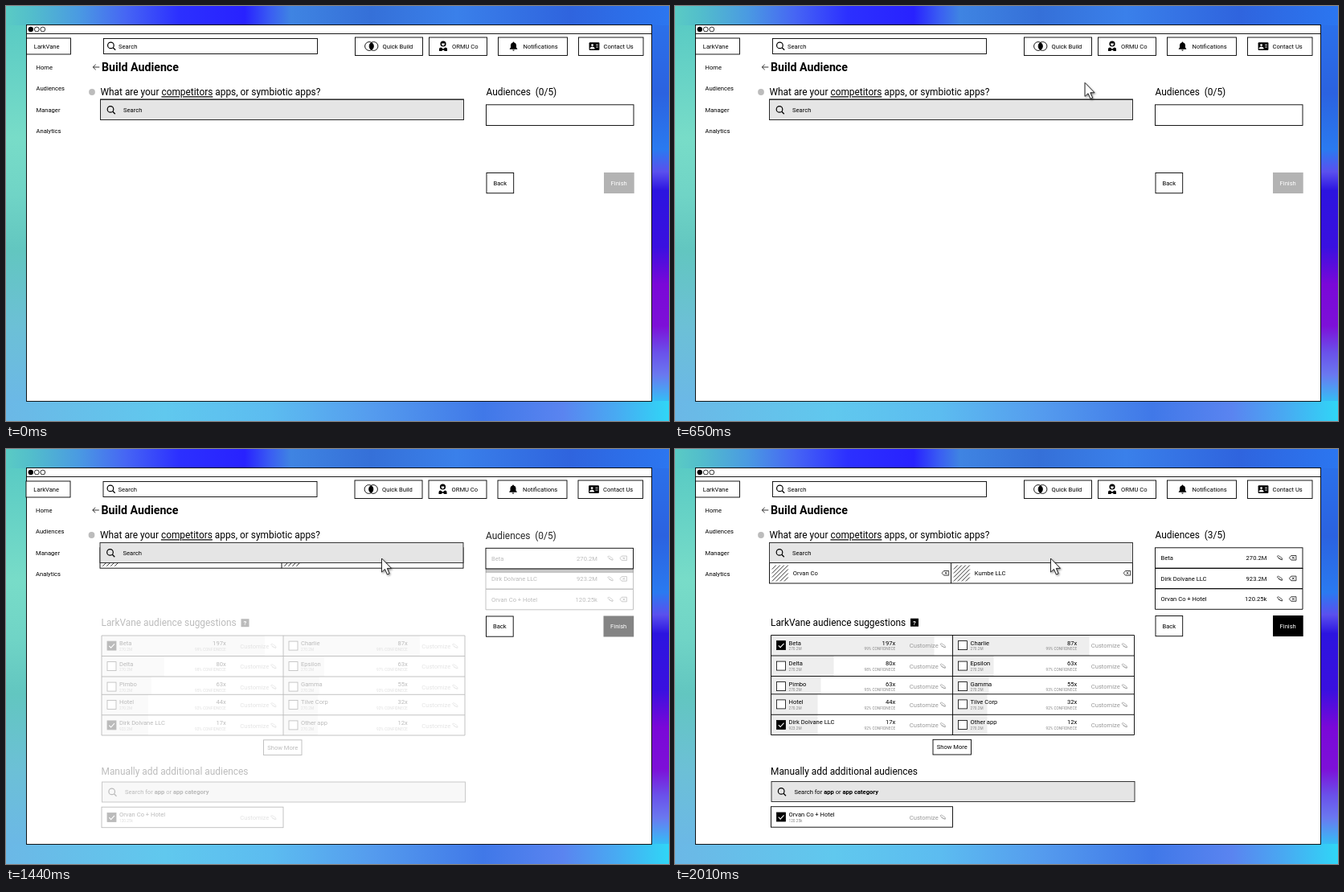
Recreate the animation shown at these times as an HTML page. Size 825 px wide and 516 px high, loop 4.87 s.

```html
<!DOCTYPE html>
<html lang="en">
<head>
<meta charset="utf-8">
<title>Build Audience</title>
<style>
  html, body { margin: 0; width: 100%; height: 100%; overflow: hidden; }
  svg { display: block; width: 825px; height: 516px; }
  text { font: 7.6px Roboto, sans-serif; white-space: pre; }
  .title { font-size: 11.9px; }
  .heading { font-size: 14.2px; font-weight: 700; }
  .tiny { font-size: 4.75px; fill: #888; }
  .end { text-anchor: end; }
  .mid { text-anchor: middle; }
  .muted { fill: #999; }
  .box { fill: #fff; stroke: #000; stroke-width: .9; }
  .field { fill: #e5e5e5; stroke: #222; stroke-width: .9; }
  .line { fill: none; stroke: #000; stroke-width: .9; }
</style>
</head>
<body>
<svg id="stage" viewBox="0 0 825 516"></svg>
<script>
const SIZES = { title: 11.9, heading: 14.2, tiny: 4.75 };

// Text is placed by the middle of its capitals.
function text(x, y, content, cls = '', extra = '') {
  const size = SIZES[cls.split(' ')[0]] || 7.6;
  return `<text x="${x}" y="${y + size * .36}" class="${cls}" ${extra}>${content}</text>`;
}
const rect = (x, y, w, h, cls = 'box', extra = '') =>
  `<rect x="${x}" y="${y}" width="${w}" height="${h}" class="${cls}" ${extra}/>`;
const line = (d, extra = '') => `<path class="line" d="${d}" ${extra}/>`;
const group = (id, content, extra = '') => `<g id="${id}" ${extra}>${content}</g>`;
const fill = (id, vertical, stops) =>
  `<linearGradient id="${id}" ${vertical ? 'x2="0" y2="1"' : ''}>` +
  stops.map(([at, color]) => `<stop offset="${at}%" stop-color="${color}"/>`).join('') +
  '</linearGradient>';

const magnifier = (x, y) =>
  `<circle class="line" cx="${x - .6}" cy="${y - .6}" r="3.8" style="stroke-width:1.2"/>` +
  line(`M${x + 2.2} ${y + 2.2}l3 3`, 'style="stroke-width:1.3"');
const pencil = (x, y, color) =>
  `<path d="M${x - 3.4} ${y - 1.8}l1.6 -1 4.4 2.8 .8 2 -2.4 -.2zm1.4 2.2l5 2.2" fill="none" stroke="${color}" stroke-width=".7"/>`;
const backspace = (x, y) =>
  line(`M${x - 4.3} ${y}l2.3 -2.8h6.2v5.6h-6.2zM${x - .8} ${y - 1.4}l2.8 2.8m0 -2.8l-2.8 2.8`, 'style="stroke-width:.75"');
const checkbox = (x, y, on) =>
  rect(x, y - 5.5, 11, 11, 'box', `style="stroke-width:.8;fill:${on ? '#000' : '#fff'}"`) +
  (on ? `<path d="M${x + 2.3} ${y + .2}l2.3 2.4 4.4 -4.8" fill="none" stroke="#fff" stroke-width="1.1"/>` : '');
const customize = (x, y) => text(x, y, 'Customize', 'muted') + pencil(x + 41.5, y, '#999');

function backdrop() {
  return '<defs>' +
    fill('top', false, [[0, '#5acbc4'], [4, '#52bdcc'], [11, '#4a9ae2'], [18, '#4666f4'], [26, '#2c30ff'],
      [36, '#2822ff'], [40, '#3a5ff2'], [43, '#3f84e2'], [55, '#3570d8'], [68, '#3a80ea'], [85, '#2f64de'], [100, '#2b76f0']]) +
    fill('bottom', false, [[0, '#6bb8e6'], [24, '#60c8ee'], [40, '#5cbcf0'], [55, '#559cee'], [72, '#4078e8'],
      [84, '#5a84f0'], [92, '#48aaf2'], [100, '#30d6f6']]) +
    fill('left', true, [[0, '#5acbc4'], [30, '#78dcc8'], [45, '#70d4c6'], [60, '#62c6c0'], [80, '#6cc0d6'], [100, '#6bb8e6']]) +
    fill('right', true, [[0, '#2b70ea'], [18, '#2b62e0'], [33, '#2a7af0'], [39, '#5a50ee'], [44, '#2c14e0'], [59, '#3a10e0'],
      [69, '#7a08d8'], [80, '#7d10d8'], [87, '#6a50ea'], [93, '#6a78f0'], [100, '#35bdf5']]) +
    '<filter id="shadow" x="-50%" y="-50%" width="200%" height="200%"><feDropShadow dx="1.2" dy="1.4" stdDeviation=".9" flood-opacity=".45"/></filter></defs>' +
    rect(0, 0, 825, 24, '', 'fill="url(#top)"') + rect(0, 491, 825, 25, '', 'fill="url(#bottom)"') +
    rect(0, 24, 26, 467, '', 'fill="url(#left)"') + rect(803, 24, 22, 467, '', 'fill="url(#right)"') +
    rect(25.5, 23.5, 778, 468) + line('M25.5 34.5h778') +
    [30.8, 38.3, 45.8].map((x, i) =>
      `<circle class="box" cx="${x}" cy="29" r="2.9" style="stroke-width:.8;${i ? '' : 'fill:#000'}"/>`).join('');
}

function header() {
  const buttons = [[434.5, 84, 468.5, 'Quick Build'], [526.5, 72, 555, 'ORMU Co'],
    [612.5, 86, 643.5, 'Notifications'], [712.5, 80.5, 743.5, 'Contact Us']];
  return rect(25.5, 40, 55, 20) + text(50.7, 50.2, 'LarkVane', 'mid') +
    rect(121.5, 40.5, 266, 19) + magnifier(131, 49.5) + text(140, 50.2, 'Search') +
    buttons.map(([x, w, tx, label]) => rect(x, 39, w, 22.5) + text(tx, 50.2, label)).join('') +
    // overlapping circles
    '<circle class="line" cx="452" cy="50" r="5.4"/><circle class="line" cx="457.5" cy="50" r="5.4"/>' +
    '<path d="M454.75 45.4a5.4 5.4 0 0 1 0 9.2a5.4 5.4 0 0 1 0 -9.2z"/>' +
    // person
    '<circle cx="544" cy="47" r="3.6"/><path d="M542.2 46.6h3.6v1a1.8 1.8 0 0 1 -3.6 0z" fill="#fff"/>' +
    '<path d="M539 56v-2.6q0 -2 2.4 -2l2.6 2 2.6 -2q2.4 0 2.4 2v2.6h-3l-2 -1.6 -2 1.6z"/>' +
    // bell
    '<path d="M626.8 53.8v-.8l1.2 -1.2v-3.2q.2 -2.6 2.6 -3.2a.9 .9 0 0 1 1.8 0q2.4 .6 2.6 3.2v3.2l1.2 1.2v.8zM630.3 54.5h2.4a1.2 1.2 0 0 1 -2.4 0z"/>' +
    // contact card
    '<rect x="725.6" y="45.2" width="12.8" height="9.8" rx="1"/><circle cx="729.6" cy="48.6" r="1.4" fill="#fff"/>' +
    '<path d="M726.9 53q.4 -2 2.7 -2t2.7 2zM734 48.4h3m-3 2.6h3" fill="#fff" stroke="#fff" stroke-width=".9"/>';
}

function navigation() {
  return ['Home', 'Audiences', 'Manager', 'Analytics'].map((label, i) => text(37.5, 76.2 + 26.5 * i, label)).join('') +
    line('M116.3 76h-8m3.4 -3.3l-3.4 3.3 3.4 3.3', 'style="stroke-width:.8"') +
    text(119, 76, 'Build Audience', 'heading') +
    '<circle cx="107" cy="107" r="3.9" fill="#bcbcbc"/>' +
    text(117.5, 107, 'What are your <tspan text-decoration="underline">competitors</tspan> apps, or symbiotic apps?', 'title');
}

function chips() {
  return rect(117.5, 141.5, 452, 25.5) + line('M343.5 141.5v25.5') +
    [[117.5, 'Orvan Co'], [343.5, 'Kumbe LLC']].map(([x, name]) => {
      let hatch = '';
      for (let d = 5; d < 40; d += 5) {
        const a = Math.min(d, 20), b = d - a;
        hatch += `M${x + 3.3 + b} ${144.5 + a}L${x + 3.3 + a} ${144.5 + b}`;
      }
      return line(hatch, 'style="stroke-width:.8"') + text(x + 29.3, 154.7, name) + backspace(x + 219, 154.3);
    }).join('');
}

function suggestions() {
  const tops = [231.5, 257, 282.5, 304.8, 330.3];
  // name, multiple, confidence, bar width
  const columns = [
    [119.5, [['Beta', 197, 99, 203], ['Delta', 80, 98, 78], ['Pimbo', 63, 95, 62], ['Hotel', 44, 92, 58], ['Dirk Dolvane LLC', 17, 92, 58]]],
    [345.5, [['Charlie', 87, 99, 170], ['Epsilon', 63, 97, 51], ['Gamma', 55, 93, 45], ['Tilve Corp', 32, 92, 43], ['Other app', 12, 92, 43]]]
  ];
  let out = text(119, 215.3, 'LarkVane audience suggestions', 'title') +
    rect(293, 210.7, 10, 10, '') + text(298, 215.9, '?', 'mid', 'fill="#fff" font-weight="700" style="font-weight:700"');
  for (const [x, rows] of columns) {
    rows.forEach(([name, multiple, confidence, bar], i) => {
      const y = tops[i], checked = x < 300 && (i === 0 || i === 4);
      out += rect(x, y, bar, (tops[i + 1] || 355.5) - y, '', 'fill="#eee"') +
        checkbox(x + 7, y + 12.6, checked) + text(x + 22, y + 9.3, name) +
        text(x + 22, y + 17.1, i === 4 && checked ? '923.2M' : '270.2M', 'tiny') +
        text(x + 154.7, y + 9.3, multiple + 'x', 'end') +
        text(x + 154.7, y + 17.1, confidence + '% CONFIDNECE', 'tiny end') + customize(x + 172.3, y + 13);
    });
  }
  return out + line('M119.5 231.5h452v124h-452zM345.5 231.5v124' + tops.slice(1).map(y => `M119.5 ${y}h452`).join('')) +
    rect(321, 361.3, 47.5, 18.7) + text(344.8, 370.6, 'Show More', 'mid') +
    text(119, 400.4, 'Manually add additional audiences', 'title') +
    rect(120, 413.5, 452, 25, 'field') + magnifier(132.8, 426) +
    text(148.5, 426.2, 'Search for <tspan font-weight="700">app</tspan> or <tspan font-weight="700">app category</tspan>') +
    rect(119.5, 444.7, 226, 25.5) + checkbox(126.5, 457.5, true) +
    text(141.5, 454, 'Orvan Co + Hotel') + text(141.5, 461.8, '120.25k', 'tiny') + customize(291.8, 457.8);
}

function sidePanel() {
  const rows = [['Beta', '270.2M'], ['Dirk Dolvane LLC', '923.2M'], ['Orvan Co + Hotel', '120.25k']];
  return text(597.5, 107, 'Audiences  (0/5)', 'title', 'id="before"') +
    text(597.5, 107, 'Audiences  (3/5)', 'title', 'id="after"') +
    rect(597.5, 148.5, 183.5, 0, '', 'id="sheet"') + rect(597.5, 122.8, 183.5, 25.7) +
    group('rows', rows.map(([name, size], i) => {
      const y = 135.3 + 25.6 * i;
      return (i ? line(`M597.5 ${y - 12.8}v25.6h183.5v-25.6z`) : '') + text(604.5, y, name) +
        text(736.3, y, size, 'end') + pencil(752.5, y, '#222') + backspace(768.7, y);
    }).join('')) +
    rect(598, 207.5, 33.7, 25.2) + text(614.8, 220, 'Back', 'mid') +
    rect(744, 207, 37.7, 26, '', 'id="finish"') + text(762.7, 220, 'Finish', 'mid', 'style="fill:#fff"');
}

const stage = document.getElementById('stage');
stage.innerHTML = backdrop() +
  group('content', header() + navigation() +
    group('chips', chips()) +
    rect(117.5, 116.5, 452, 25, 'field') + magnifier(130.6, 129) + text(146, 129.2, 'Search') +
    group('lower', suggestions()) + group('side', sidePanel())) +
  group('cursor', '<path d="M0 0V17L4 13.4 6.9 20 9.6 18.8 6.8 12.4H12z" fill="#fff" stroke="#111" stroke-width=".9" filter="url(#shadow)"/>');

// Smooth monotone curve through [time, value] points.
function curve(points, t) {
  const last = points.length - 1;
  if (t <= points[0][0]) return points[0][1];
  if (t >= points[last][0]) return points[last][1];
  const slope = i => (points[i + 1][1] - points[i][1]) / (points[i + 1][0] - points[i][0]);
  const tangent = i => {
    if (i === 0) return slope(0);
    if (i === last) return slope(last - 1);
    const a = slope(i - 1), b = slope(i);
    return a * b > 0 ? 2 * a * b / (a + b) : 0;
  };
  const i = points.findIndex(p => p[0] > t) - 1;
  const [t0, v0] = points[i], [t1, v1] = points[i + 1], span = t1 - t0, k = (t - t0) / span;
  return v0 + (v1 - v0) * k * k * (3 - 2 * k) +
    span * k * (1 - k) * (tangent(i) * (1 - k) - tangent(i + 1) * k);
}

const LOOP = 4870;
const cursorX = [[210, 608], [440, 575.5], [730, 499], [780, 499], [860, 488.5], [1130, 467.5]];
const cursorY = [[210, -24], [440, 22.5], [730, 107], [780, 107], [860, 117.5], [1130, 136]];
const reveal = [[1310, 0], [1440, .26], [1660, .6], [1870, .93], [2010, 1]];
const sheetHeight = [[1310, 0], [1440, 5], [1660, 25.5]];
const sheetShade = [[1310, .26], [1440, .22], [1660, .11], [1870, .02], [2010, 0]];
const part = id => document.getElementById(id);
const set = (id, name, value) => part(id).setAttribute(name, value);

function draw(t) {
  const p = curve(reveal, t), moving = t >= 1330 && t < 2010;
  set('cursor', 'transform', `translate(${curve(cursorX, t)} ${curve(cursorY, t)})`);
  set('content', 'transform', `translate(${moving ? -.5 : 0} 0)`);
  for (const id of ['lower', 'side']) set(id, 'transform', `translate(0 ${moving ? .5 : 0})`);
  set('chips', 'transform', `translate(0 ${-25.5 * (1 - p)})`);
  for (const id of ['lower', 'rows', 'after']) set(id, 'opacity', p);
  set('before', 'opacity', 1 - p);
  set('sheet', 'height', curve(sheetHeight, t));
  set('sheet', 'fill-opacity', curve(sheetShade, t));
  const gray = Math.round(179 * (1 - p));
  set('finish', 'fill', `rgb(${gray},${gray},${gray})`);
}

const start = performance.now();
function frame() {
  draw((performance.now() - start) % LOOP);
  requestAnimationFrame(frame);
}
frame();
</script>
</body>
</html>
```
